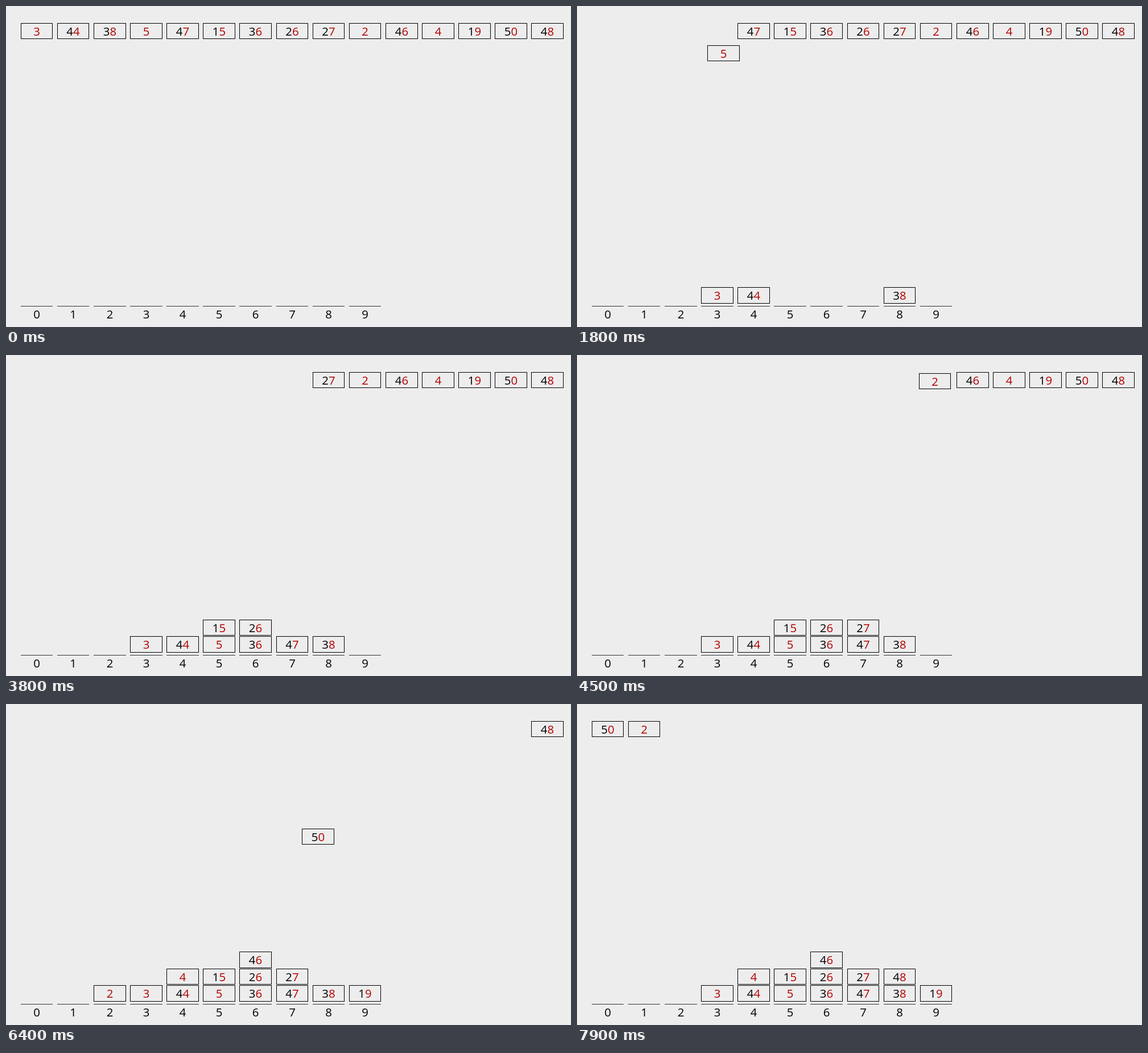
An HTML page that plays this animation: 993 by 564 pixels, repeating every 8 s.

```html
<!DOCTYPE html>
<html lang="en">
<head>
<meta charset="utf-8">
<title>Radix sort</title>
<style>
  html, body { margin: 0; width: 100%; height: 100%; overflow: hidden; background: #ededed; }
  body { position: relative; font: 20.4px/26px "Open Sans", "Noto Sans", sans-serif; color: #000; }
  div { position: absolute; box-sizing: border-box; text-align: center; }
  .card { border: 1px solid #000; white-space: nowrap; }
  .card b { font-weight: 400; color: #b40000; }
  .line { top: 527px; height: 1px; background: #333; }
  .label { top: 528px; }
</style>
</head>
<body>
<script>
const LOOP = 8000, TICK = 100;
const FIRST = 374, PERIOD = 456, MOVE = 210;
const COLUMN = 64.12, ROW = 29.5;
const values = [3, 44, 38, 5, 47, 15, 36, 26, 27, 2, 46, 4, 19, 50, 48];

const left = k => Math.round(25.75 + COLUMN * k);
const right = k => Math.round(82.3 + COLUMN * k);
const listSlot = k => [left(k), 30, right(k), 58];
const bucketSlot = (k, row) => [left(k), 494.4 - ROW * row, right(k), 522.6 - ROW * row];
const startOf = step => FIRST + PERIOD * step;
const ease = t => t < 0.5 ? 4 * t ** 3 : 1 - 4 * (1 - t) ** 3;

function add(cls, html) {
  const el = document.createElement('div');
  el.className = cls;
  el.innerHTML = html;
  document.body.append(el);
  return el;
}

for (let k = 0; k < 10; k++) {
  for (const el of [add('line', ''), add('label', k)]) {
    el.style.left = left(k) + 'px';
    el.style.width = right(k) - left(k) + 'px';
  }
}

// Deal the cards into buckets by last digit, then collect them in order.
const heights = Array(10).fill(0);
const cards = values.map((value, i) => {
  const digit = value % 10;
  const to = bucketSlot(digit, heights[digit]++);
  return { value, digit, home: listSlot(i), moves: [{ start: startOf(i), to }] };
});
[...cards].sort((a, b) => a.digit - b.digit).forEach((card, i) => {
  card.moves.push({ start: startOf(cards.length + i), to: listSlot(i) });
});

function boxAt(card, time) {
  let box = card.home;
  for (const { start, to } of card.moves) {
    const p = ease(Math.min(1, Math.max(0, (time - start) / MOVE)));
    box = box.map((v, i) => v + (to[i] - v) * p);
  }
  return box.map(Math.round);
}

for (const card of cards) {
  const tens = Math.floor(card.value / 10) || '';
  const el = add('card', `${tens}<b>${card.digit}</b>`);
  const frames = [];
  for (let time = 0; time <= LOOP; time += TICK) {
    const [l, t, r, b] = boxAt(card, time);
    frames.push({
      offset: time / LOOP, easing: 'step-end',
      left: l + 'px', top: t + 'px', width: r - l + 'px', height: b - t + 'px'
    });
  }
  el.animate(frames, { duration: LOOP, iterations: Infinity });
}
</script>
</body>
</html>
```
